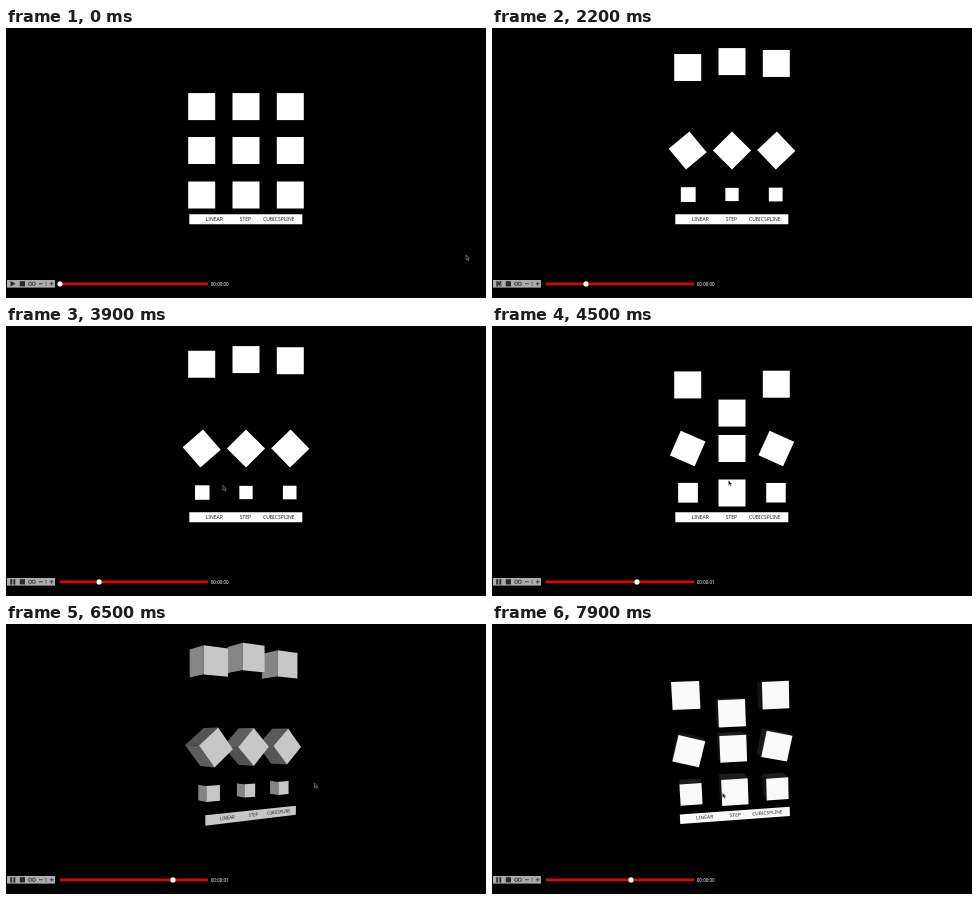
These frames come from a looping animation (480 by 270 pixels, 8000 ms). An HTML page with a canvas:

```html
<!DOCTYPE html>
<html>
<head>
<meta charset="utf-8">
<style>
html, body { margin: 0; width: 100%; height: 100%; overflow: hidden; background: #000; }
canvas { display: block; width: 480px; height: 270px; }
</style>
</head>
<body>
<canvas id="stage"></canvas>
<script>
const canvas = document.getElementById('stage');
const dpr = window.devicePixelRatio || 1;
canvas.width = 480 * dpr;
canvas.height = 270 * dpr;
const ctx = canvas.getContext('2d');

const LOOP = 8000, STEP = 100, CLIP = 1667;
const CX = 240, CY = 131, HALF = 13.5, DIST = 500, FOCAL = DIST - HALF;
const STARTS = [1737, 3447, 5192, 6916];

// Rows are [time, ...values]
const CURSOR = [[0, 460, 227], [900, 12, 250], [1600, 6, 253], [2700, 6, 253], [3200, 194, 165],
  [4500, 236.5, 154.5], [5600, 304, 159], [6000, 308.5, 159], [7100, 308.5, 159], [7900, 230.5, 169]];
const ORBIT = [[4600, 0, 0, 0], [5600, 32.5, 1.5, 0], [6000, 35.5, 2, 0],
  [7100, 35.5, 2, 0], [7900, 6.5, 9.5, 2.2]];

// Values at each quarter of the clip
const LIFT = [0, 45, -8.5, 45, -8.5];
const ANGLE = [0, 45, 90, 135, 180];
const SCALE = [1, .5, 1, .5, 1];

const EASE = [u => u, () => 0, u => u * u * (3 - 2 * u)];
const rad = d => d * Math.PI / 180;
const mix = (a, b, u) => a + (b - a) * u;

function track(keys, t) {
  if (t <= keys[0][0]) return keys[0].slice(1);
  const i = keys.findIndex(k => k[0] > t);
  if (i < 0) return keys[keys.length - 1].slice(1);
  const a = keys[i - 1], b = keys[i], u = (t - a[0]) / (b[0] - a[0]);
  return a.slice(1).map((v, j) => mix(v, b[j + 1], u));
}

function sample(values, p, ease) {
  if (p >= 1) return values[4];
  const i = Math.floor(p * 4);
  return mix(values[i], values[i + 1], ease(p * 4 - i));
}

function makeView([yaw, pitch, roll]) {
  const [cy, cp, cr] = [yaw, pitch, roll].map(d => Math.cos(rad(d)));
  const [sy, sp, sr] = [yaw, pitch, roll].map(d => Math.sin(rad(d)));
  return ([x, y, z]) => {
    const x1 = x * cy + z * sy, z1 = z * cy - x * sy;
    const y1 = y * cp + z1 * sp;
    return [x1 * cr + y1 * sr, y1 * cr - x1 * sr, z1 * cp - y * sp];
  };
}

function project([x, y, z]) {
  const s = FOCAL / (DIST - z);
  return [CX + x * s, CY + y * s];
}

function poly(points, fill) {
  ctx.beginPath();
  points.forEach(p => ctx.lineTo(p[0], p[1]));
  ctx.closePath();
  ctx.fillStyle = fill;
  ctx.fill();
}

function shade(nz) {
  const g = Math.round(255 * Math.pow(Math.max(nz, 0), 1.2));
  return `rgb(${g},${g},${g})`;
}

function drawCube(view, { pos, angle, scale }) {
  const c = Math.cos(rad(angle)), s = Math.sin(rad(angle)), h = HALF * scale;
  const turn = ([x, y, z]) => [x * c - y * s, x * s + y * c, z];
  const place = v => view(turn(v).map((n, i) => n * h + pos[i]));
  for (let axis = 0; axis < 3; axis++) for (const side of [-1, 1]) {
    const at = (a, b) => {
      const v = [0, 0, 0];
      v[axis] = side;
      v[(axis + 1) % 3] = a;
      v[(axis + 2) % 3] = b;
      return v;
    };
    const n = view(turn(at(0, 0))), mid = place(at(0, 0));
    if (n[2] * (DIST - mid[2]) - n[0] * mid[0] - n[1] * mid[1] <= 0) continue;
    const corners = [at(-1, -1), at(1, -1), at(1, 1), at(-1, 1)];
    poly(corners.map(v => project(place(v))), shade(n[2]));
  }
}

function drawCubes(view, p) {
  const cubes = [];
  EASE.forEach((ease, col) => {
    const x = (col - 1) * 44.3;
    cubes.push(
      { pos: [x, 78.6 - CY - sample(LIFT, p, ease), 0], angle: 0, scale: 1 },
      { pos: [x, 122.5 - CY, 0], angle: sample(ANGLE, p, ease), scale: 1 },
      { pos: [x, 167 - CY, 0], angle: 0, scale: sample(SCALE, p, ease) });
  });
  cubes.sort((a, b) => view(a.pos)[2] - view(b.pos)[2]);
  cubes.forEach(cube => drawCube(view, cube));
}

function drawPanel(view) {
  const at = (x, y) => project(view([x - CX, y - CY, HALF]));
  poly([at(183.3, 186.3), at(296.3, 186.3), at(296.3, 196.2), at(183.3, 196.2)], shade(view([0, 0, 1])[2]));
  ctx.fillStyle = '#222';
  ctx.font = '5px "Noto Sans", sans-serif';
  for (const [word, x, w] of [['LINEAR', 199.6, 17], ['STEP', 233.8, 12], ['CUBICSPLINE', 257, 31]]) {
    const y = 192.7, o = at(x, y), r = at(x + w, y), d = at(x + w / 2, y + 4), m = at(x + w / 2, y);
    ctx.save();
    ctx.transform((r[0] - o[0]) / w, (r[1] - o[1]) / w, (d[0] - m[0]) / 4, (d[1] - m[1]) / 4, o[0], o[1]);
    ctx.fillText(word, 0, 0);
    ctx.restore();
  }
}

function rect(x, y, w, h, fill) {
  ctx.fillStyle = fill;
  ctx.fillRect(x, y, w, h);
}

function circle(x, y, r) {
  ctx.beginPath();
  ctx.arc(x, y, r, 0, Math.PI * 2);
}

function drawControls(p, playing) {
  const ink = '#2a2a2a';
  rect(1, 252, 48, 7.6, '#acacac');
  if (playing) {
    rect(4.3, 253.2, 1.9, 5.4, ink);
    rect(7.4, 253.2, 1.9, 5.4, ink);
  } else {
    poly([[4.5, 253], [9.6, 255.8], [4.5, 258.6]], ink);
  }
  rect(13.8, 253.2, 5.2, 5.2, ink);
  ctx.strokeStyle = ink;
  ctx.lineWidth = .8;
  for (const x of [24.2, 27.8]) {
    circle(x, 255.8, 1.7);
    ctx.stroke();
  }
  rect(33, 255.4, 3.8, .8, ink);
  rect(43.8, 255.4, 3.8, .8, ink);
  rect(45.3, 253.9, .8, 3.8, ink);
  ctx.font = '5px "Noto Sans", sans-serif';
  ctx.fillText('1', 38.6, 257.7);

  rect(54, 254.6, 148, 2.6, '#e60000');
  circle(54 + 144 * p, 255.9, 2.6);
  ctx.fillStyle = '#fff';
  ctx.fill();
  const sec = Math.floor(p * CLIP / 1000);
  ctx.font = '4.5px "Noto Sans", sans-serif';
  ctx.fillText('00:00:0' + sec, 204.8, 257.6);
}

function drawCursor([x, y]) {
  const tip = [[0, 0], [0, 4.8], [1.2, 3.8], [2, 5.6], [2.8, 5.2], [2.1, 3.5], [3.5, 3.4]];
  poly(tip.map(([a, b]) => [x + a, y + b]), '#111');
  ctx.strokeStyle = '#aaa';
  ctx.lineWidth = .5;
  ctx.stroke();
}

function draw(t) {
  ctx.setTransform(dpr, 0, 0, dpr, 0, 0);
  rect(0, 0, 480, 270, '#000');
  const start = STARTS.filter(s => s <= t).pop();
  const playing = start !== undefined;
  const p = playing ? Math.min(1, (t - start) / CLIP) : 0;
  const view = makeView(track(ORBIT, t));
  drawCubes(view, p);
  drawPanel(view);
  drawControls(p, playing);
  drawCursor(track(CURSOR, t));
}

const begin = performance.now();
function frame() {
  const t = (performance.now() - begin) % LOOP;
  draw(Math.floor(t / STEP) * STEP);
  requestAnimationFrame(frame);
}
frame();
</script>
</body>
</html>
```
